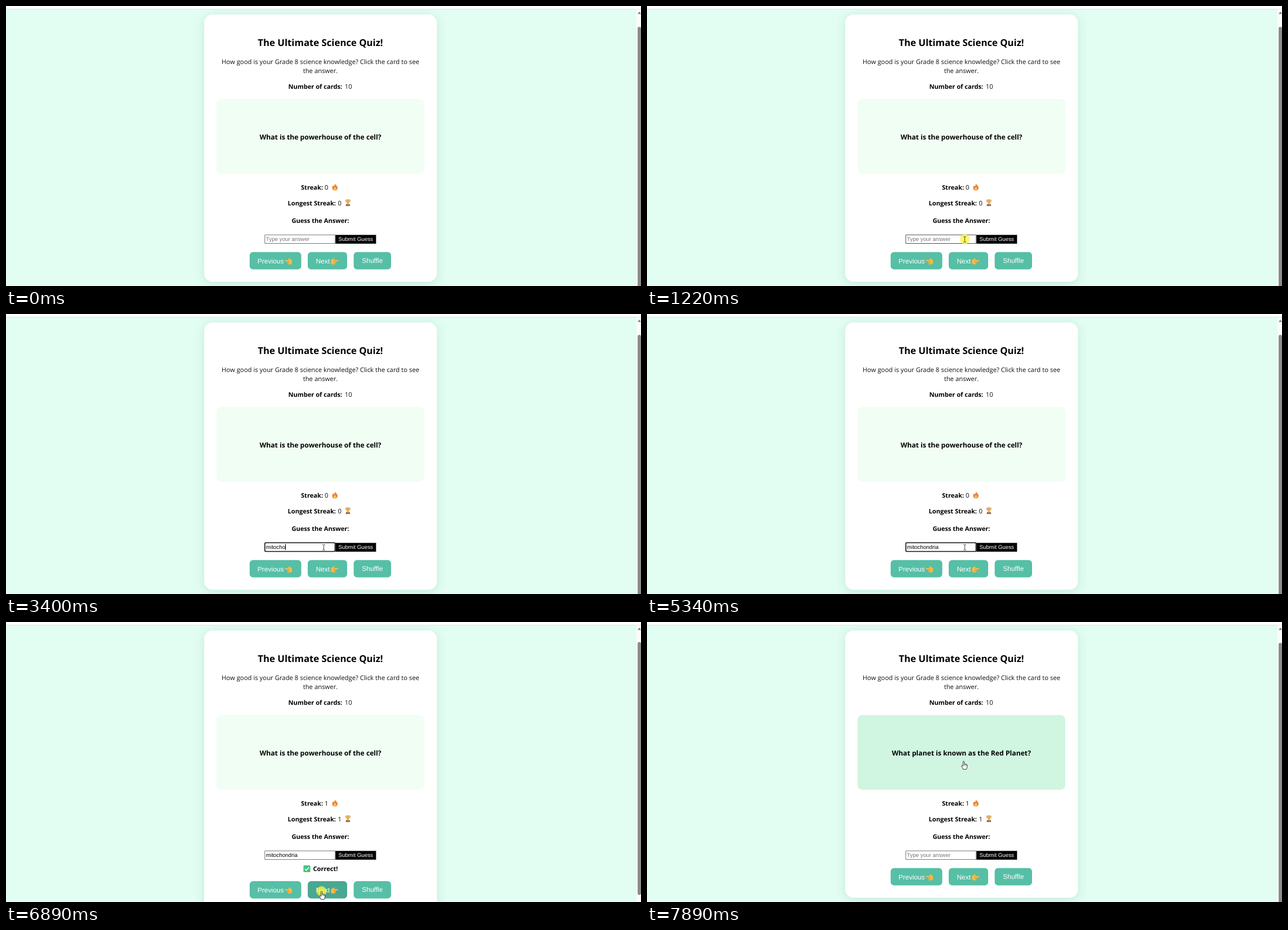
An HTML page with a canvas for the animation above (8000 ms loop, 1128 px wide and 497 px high).

```html
<!DOCTYPE html>
<html lang="en">
<head>
<meta charset="utf-8">
<title>Science Quiz</title>
<style>
  html, body { margin: 0; width: 100%; height: 100%; overflow: hidden; background: #e2fdf2; }
  canvas { display: block; }
</style>
</head>
<body>
<canvas id="stage" width="1128" height="497"></canvas>
<script>
const ctx = document.getElementById('stage').getContext('2d');
const LOOP = 8000;
const SANS = '"Open Sans", "Noto Sans", sans-serif';
const ARIAL = '"Liberation Sans", Arial, sans-serif';
const BODY = '11.33px ' + SANS;
const BOLD = 'bold 11.1px ' + SANS;
const FIELD = '9.8px ' + ARIAL;
const BUTTON = '12px ' + ARIAL;
const MID = 558.5;

const ANSWER = 'mitochondria';
const KEY_TIMES = [1810, 1970, 2360, 2550, 2950, 3140, 3400, 3610, 3990, 4290, 4550, 4870];
const FOCUS = 1290, BLUR = 5920, CORRECT = 6130, NEXT = 7070;
const CLICKS = [[1220, 1350], [5920, 5990], [6860, 6930]];

// Pointer path: time, x, y
const PATH = [
  [280, 1019, 486], [330, 830, 462], [380, 644, 481], [660, 644, 481],
  [800, 608, 479], [940, 588, 455], [1080, 565, 414], [5340, 565, 414],
  [5850, 611, 413.5], [6520, 611, 413.5], [6690, 590, 450], [6860, 561, 478],
  [7400, 561, 478], [7540, 562, 380], [7680, 563, 192], [7750, 563, 195], [7890, 563, 247]
];

const clamp = v => Math.max(0, Math.min(1, v));
const mix = (a, b, k) => a + (b - a) * k;

function text(str, x, y, font, color = '#000', align = 'left') {
  ctx.font = font;
  ctx.fillStyle = color;
  ctx.textAlign = align;
  ctx.fillText(str, x, y);
}

function rect(x, y, w, h, color) {
  ctx.fillStyle = color;
  ctx.fillRect(x, y, w, h);
}

function box(x, y, w, h, r, fill) {
  ctx.beginPath();
  ctx.roundRect(x, y, w, h, r);
  ctx.fillStyle = fill;
  ctx.fill();
}

function shape(d, fill, stroke, width = 1) {
  const p = new Path2D(d);
  if (fill) { ctx.fillStyle = fill; ctx.fill(p); }
  if (stroke) { ctx.strokeStyle = stroke; ctx.lineWidth = width; ctx.stroke(p); }
}

function at(x, y, draw, flip = 1) {
  ctx.save();
  ctx.translate(x, y);
  ctx.scale(flip, 1);
  draw();
  ctx.restore();
}

function fire() {
  shape('M5 0C6 3 10 4 9.8 8C9.6 11 7.5 12.5 5 12.5C2 12.5 .2 10.5 .2 8C.2 6 1 5 1.8 3.6L3 5C4.5 4 5 2 5 0Z', '#e8813a');
  shape('M5.3 5.5C5.8 7.5 7.8 7.8 7.5 10C7.2 11.6 6 12.1 5 12.1C3.3 12.1 2.3 11 2.5 9.4C2.7 8 4.6 7.6 5.3 5.5Z', '#fbbf55');
}

function trophy() {
  shape('M2.5 1.6H.7C.7 4.3 1.6 5.4 3.4 5.6M7.5 1.6H9.3C9.3 4.3 8.4 5.4 6.6 5.6', null, '#d39a4c', 1);
  shape('M2 .3H8V3.5C8 5.7 6.7 7 5 7S2 5.7 2 3.5Z', '#e9ab55');
  shape('M4.3 6.5H5.7V9H4.3Z', '#c98a43');
  shape('M2 8.6H8L9 12H1Z', '#7d5a48');
  shape('M3.4 9.6H6.6V10.8H3.4Z', '#e3b266');
}

function pointingHand() {
  shape('M.3 4C1.8 2.5 3.7 1.6 5.4 .8C6.6 .3 7.4 1.3 6.6 2.3L5.6 3.6H11.8C13.5 3.6 13.5 6 11.8 6H8.4C9.2 6.5 9 7.6 8.3 7.9C8.8 8.6 8.5 9.4 7.8 9.7C8 10.7 7.4 11.4 6.4 11.4H3.5C1.8 11.4 .3 10.4 .3 8.7Z', '#fcbb3f');
  shape('M5 6H8.3M5.1 7.9H8.2M5.2 9.7H7.7', null, '#df8738', .7);
}

function arrow() {
  shape('M0 0V10.8L2.6 8.6L4.2 12.2L5.9 11.4L4.3 7.9H7.4Z', '#fff', '#222', .9);
}

function iBeam() {
  shape('M-2.5 -4.5H-.8L0 -4L.8 -4.5H2.5M0 -4V4.5M-2.5 5H-.8L0 4.5L.8 5H2.5', null, '#444', 1);
}

function linkHand() {
  shape('M-1.6 1.2C-1.6 -.3 .6 -.3 .6 1.2V5.3C1.2 4.5 2.5 4.7 2.6 5.6C3.2 5 4.2 5.3 4.3 6.1C5 5.7 5.7 6.2 5.7 7V10.3C5.7 12 4.6 12.7 4.4 14.4H-1.5C-1.8 12.6 -3.2 11 -4.3 9.1C-5 7.8 -3.5 7 -2.7 8L-1.6 9.2Z', '#fff', '#222', .9);
  shape('M.6 5.3V8M2.6 5.6V8M4.3 6.1V8', null, '#222', .7);
}

function pointerAt(t) {
  if (t < PATH[0][0]) return null;
  const i = PATH.findIndex(k => k[0] > t);
  if (i < 0) return PATH[PATH.length - 1].slice(1);
  const [t0, x0, y0] = PATH[i - 1], [t1, x1, y1] = PATH[i];
  const k = (t - t0) / (t1 - t0);
  return [mix(x0, x1, k), mix(y0, y1, k)];
}

const inside = (p, x, y, w, h) => !!p && p[0] >= x && p[0] <= x + w && p[1] >= y && p[1] <= y + h;

function page(tall) {
  rect(0, 0, 1128, 497, '#e2fdf2');
  ctx.save();
  ctx.shadowColor = 'rgba(0, 130, 80, .15)';
  ctx.shadowBlur = 18;
  ctx.shadowOffsetY = 3;
  box(352, 15, 413.5, tall ? 498 : 474.5, 15, '#fff');
  ctx.restore();
  rect(0, 0, 1128, 5, '#fff');
  rect(0, 5, 1128, 1, '#dfe5e3');
  rect(1120, 6, 8, 491, '#fbfbfb');
  shape('M1122 14.2L1125 9.8L1128 14.2Z', '#858585');
  box(1122, tall ? 35.5 : 37, 6, tall ? 449 : 475, 3, '#8b8b8b');
}

function flashcard(t) {
  const k = clamp((t - 7580) / 300);
  const color = [[240, 208], [254, 245], [243, 225]].map(c => Math.round(mix(...c, k)));
  box(374, 165.3, 369, 132.4, 8, `rgb(${color})`);
  const question = t < NEXT ? 'What is the powerhouse of the cell?' : 'What planet is known as the Red Planet?';
  text(question, MID, 236.8, 'bold 12.2px ' + SANS, '#000', 'center');
}

function field(t, hover) {
  const focus = t >= FOCUS && t < BLUR;
  const typed = t < NEXT ? KEY_TIMES.filter(k => k <= t) : [];
  const value = ANSWER.slice(0, typed.length);
  if (focus) {
    box(459, 405.2, 126.3, 17.1, 2.2, '#101010');
    box(460.6, 406.8, 123.1, 13.9, 1, '#fff');
  } else {
    box(459.2, 405.8, 126, 16.2, 1.5, hover ? '#4f4f4f' : '#767676');
    box(460.2, 406.8, 124, 14.2, .7, '#fff');
  }
  if (value) text(value, 461.8, 416.6, FIELD);
  else text('Type your answer', 461.8, 416.6, FIELD, '#757575');
  if (!focus) return;
  const since = t - (typed.length ? typed[typed.length - 1] : FOCUS + 60);
  if (since % 1000 < 470) {
    ctx.font = FIELD;
    rect(Math.round(462 + ctx.measureText(value).width), 408, 1, 11, '#000');
  }
}

function submit() {
  rect(585, 406, 72.5, 16, '#4c4c4c');
  rect(586, 407, 71, 14.6, '#000');
  text('Submit Guess', 621.2, 416.6, FIELD, '#fff', 'center');
}

function buttons(y, p) {
  const button = (x, w, label, tx, ty) => {
    box(x, y, w, 30.8, 6, inside(p, x, y, w, 30.8) ? '#48a892' : '#56bfa6');
    text(label, tx, y + ty, BUTTON, '#fff');
  };
  button(432.8, 91.7, 'Previous', 446.8, 20.2);
  at(508.3, y + 10.6, pointingHand, -1);
  button(536, 70, 'Next', 550.4, 20.2);
  at(577, y + 10.6, pointingHand);
  button(617.6, 66.4, 'Shuffle', 632.2, 19.2);
}

function pointer(t, p, top) {
  if (!p) return;
  if (CLICKS.some(([a, b]) => t >= a && t < b)) {
    ctx.beginPath();
    ctx.arc(p[0] - .5, p[1], 9, 0, Math.PI * 2);
    ctx.fillStyle = 'rgba(255, 245, 60, .75)';
    ctx.fill();
  }
  const link = inside(p, 374, 165, 369, 132) || inside(p, 433, top, 91, 31) ||
    inside(p, 536, top, 70, 31) || inside(p, 618, top, 66, 31);
  const kind = inside(p, 459, 406, 126, 16) ? iBeam : link ? linkHand : arrow;
  at(kind === iBeam ? p[0] - .5 : p[0], p[1], kind);
}

function draw(t) {
  const correct = t >= CORRECT && t < NEXT;
  const score = t >= CORRECT ? '1' : '0';
  const top = correct ? 460 : 436.7;
  const p = pointerAt(t);

  page(correct);
  text('The Ultimate Science Quiz!', MID, 71, 'bold 16.75px ' + SANS, '#000', 'center');
  text('How good is your Grade 8 science knowledge? Click the card to see', MID, 103.3, BODY, '#111', 'center');
  text('the answer.', MID, 119.2, BODY, '#111', 'center');
  text('Number of cards:', 501.5, 147, BOLD);
  text('10', 601.7, 147, BODY, '#111');
  flashcard(t);
  text('Streak:', 524, 325.5, BOLD);
  text(score, 566, 325.5, BODY, '#111');
  at(579.2, 315, fire);
  text('Longest Streak:', 500.5, 353.5, BOLD);
  text(score, 589.6, 353.5, BODY, '#111');
  at(602.3, 343, trophy);
  text('Guess the Answer:', MID, 385.2, BOLD, '#000', 'center');
  field(t, inside(p, 459, 406, 126, 16));
  submit();
  if (correct) {
    box(528.4, 432, 12.2, 12, 1.6, '#43c57f');
    shape('M531 438.2L533.5 440.8L538.2 435.2', null, '#fff', 1.5);
    text('Correct!', 545.5, 442, BOLD);
  }
  buttons(top, p);
  pointer(t, p, top);
}

ctx.textRendering = 'geometricPrecision';
const start = performance.now();
function tick() {
  draw((performance.now() - start) % LOOP);
  requestAnimationFrame(tick);
}
tick();
</script>
</body>
</html>
```
